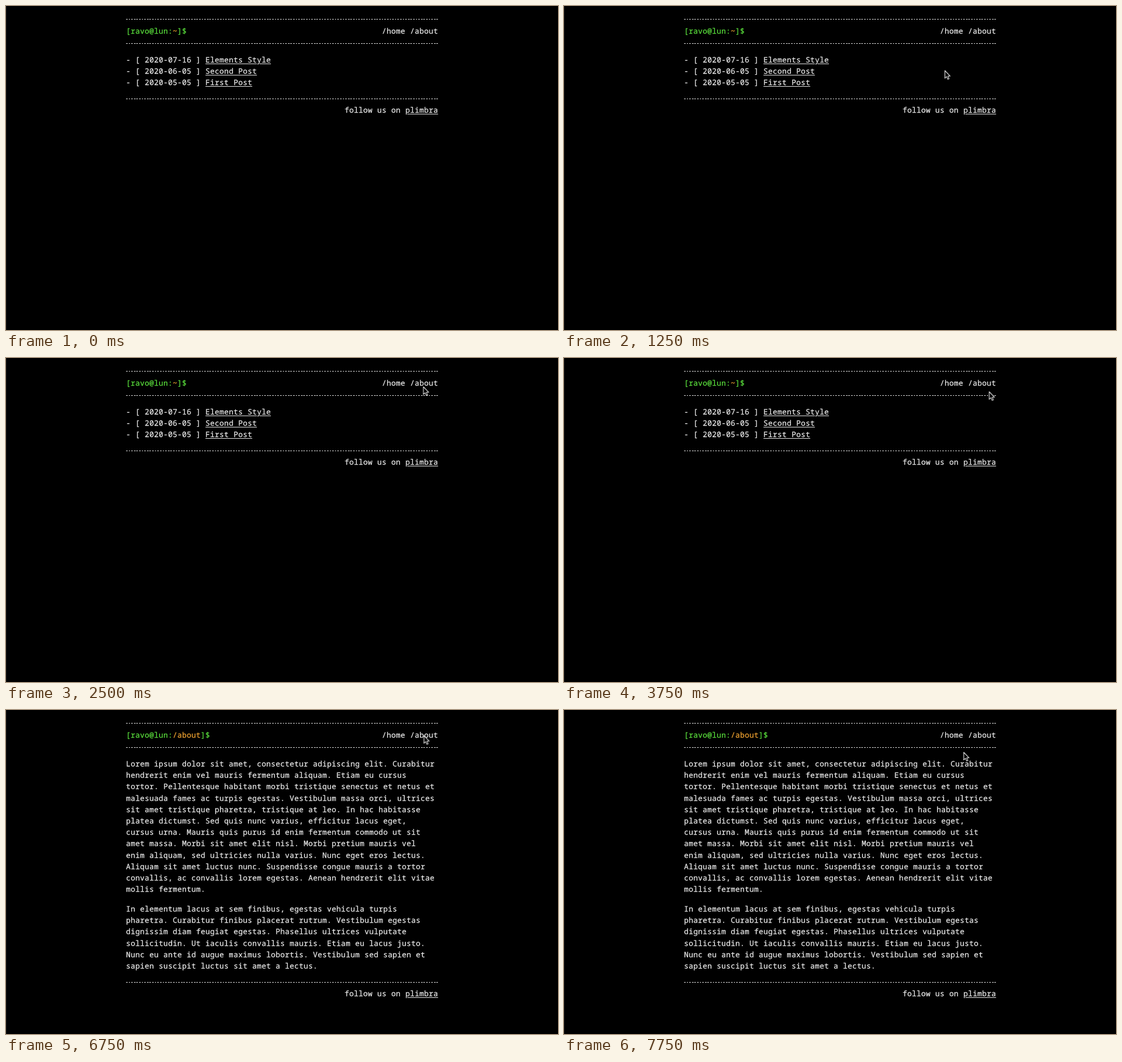
An HTML page that plays this animation: 975x574 px, repeating every 8 s.

```html
<!DOCTYPE html>
<html lang="en">
<head>
<meta charset="utf-8">
<title>Terminal blog</title>
<style>
  html, body { margin: 0; width: 100%; height: 100%; overflow: hidden; background: #000; }
  #stage {
    position: absolute; left: 0; top: 0; width: 975px; height: 574px; overflow: hidden;
    color: #ececec;
    font: 13.2px/20.21px "Noto Sans Mono", monospace;
    letter-spacing: .348px;
    text-rendering: geometricPrecision;
    -webkit-text-stroke: .25px currentColor;
  }
  #stage::before { content: ""; position: absolute; left: 0; width: 1px; height: 100%; background: #141414; }
  .page { position: absolute; inset: 0; }
  pre, .rule, .hover { position: absolute; margin: 0; font: inherit; }
  pre { left: 211.9px; white-space: pre; }
  .right { left: auto; right: 211.8px; }
  .head { top: 34.3px; }
  .prompt { color: #5adf3c; }
  .prompt i { color: #f0a330; font-style: normal; }
  .main { top: 84.9px; }
  .second { top: 342px; }
  u { text-underline-offset: 1.5px; text-decoration-thickness: 1px; }
  .rule {
    left: 211.9px; width: 551.2px; height: 1px;
    background: repeating-linear-gradient(90deg, #e0e0e0 0 2.756px, transparent 2.756px 4.609px);
  }
  .hover { left: 713px; top: 36px; width: 50.2px; height: 17.5px; background: #e6e6e6; }
  .hover pre { left: auto; right: 0; top: -1.7px; color: #000; }
  #cursor { position: absolute; left: 0; top: 0; overflow: visible; }
</style>
</head>
<body>
<div id="stage">
  <div class="rule" style="top:23px"></div>
  <div class="rule" style="top:66px"></div>
  <pre class="head right">/home /about</pre>

  <div class="page" id="home">
    <pre class="head prompt">[ravo@lun:<i>~</i>]$</pre>
    <pre class="main">- [ 2020-07-16 ] <u>Elements Style</u>
- [ 2020-06-05 ] <u>Second Post</u>
- [ 2020-05-05 ] <u>First Post</u></pre>
    <div class="rule" style="top:164px"></div>
    <pre class="right" style="top:173.8px">follow us on <u>plimbra</u></pre>
  </div>

  <div class="page" id="about">
    <pre class="head prompt">[ravo@lun:<i>/about</i>]$</pre>
    <pre class="main">Lorem ipsum dolor sit amet, consectetur adipiscing elit. Curabitur
hendrerit enim vel mauris fermentum aliquam. Etiam eu cursus
tortor. Pellentesque habitant morbi tristique senectus et netus et
malesuada fames ac turpis egestas. Vestibulum massa orci, ultrices
sit amet tristique pharetra, tristique at leo. In hac habitasse
platea dictumst. Sed quis nunc varius, efficitur lacus eget,
cursus urna. Mauris quis purus id enim fermentum commodo ut sit
amet massa. Morbi sit amet elit nisl. Morbi pretium mauris vel
enim aliquam, sed ultricies nulla varius. Nunc eget eros lectus.
Aliquam sit amet luctus nunc. Suspendisse congue mauris a tortor
convallis, ac convallis lorem egestas. Aenean hendrerit elit vitae
mollis fermentum.</pre>
    <pre class="second">In elementum lacus at sem finibus, egestas vehicula turpis
pharetra. Curabitur finibus placerat rutrum. Vestibulum egestas
dignissim diam feugiat egestas. Phasellus ultrices vulputate
sollicitudin. Ut iaculis convallis mauris. Etiam eu lacus justo.
Nunc eu ante id augue maximus lobortis. Vestibulum sed sapien et
sapien suscipit luctus sit amet a lectus.</pre>
    <div class="rule" style="top:482px"></div>
    <pre class="right" style="top:491.8px">follow us on <u>plimbra</u></pre>
  </div>

  <div class="hover" id="hover"><pre>/about</pre></div>

  <svg id="cursor" width="12" height="18">
    <path d="M.8 1V14.4L3.8 11.6 5.9 16.3 8.1 15.4 6.1 10.8H10.2Z"
          fill="#000" stroke="#f2f2f2" stroke-width="1.1" stroke-linejoin="round"/>
  </svg>
</div>
<script>
  const LOOP = 8000;

  // Plays [time, value] steps as hard cuts, each held until the next.
  function play(id, steps, toStyle) {
    const frames = steps.map(([time, ...value]) =>
      ({ offset: time / LOOP, easing: 'step-end', ...toStyle(...value) }));
    frames.push({ ...frames[frames.length - 1], offset: 1 });
    document.getElementById(id).animate(frames, { duration: LOOP, iterations: Infinity });
  }

  const opacity = value => ({ opacity: value });
  const position = (x, y) => ({ transform: `translate(${x}px, ${y}px)` });

  play('home', [[0, 1], [6750, 0]], opacity);
  play('about', [[0, 0], [6750, 1]], opacity);
  play('hover', [[0, 0], [4000, 1], [6750, 0]], opacity);
  play('cursor', [
    [0, 673, -40], [250, 673, 25.5], [500, 662, 40], [1000, 655, 65],
    [1250, 672, 113.5], [1500, 679, 117], [1750, 695, 98], [2000, 724, 65],
    [2250, 730, 58], [2500, 736.5, 50], [3000, 736.2, 50], [3250, 763, 64],
    [3500, 763.7, 64], [3750, 750.3, 58.7], [4000, 744, 51],
    [4250, 737.5, 44.5], [7750, 705.3, 74]
  ], position);
</script>
</body>
</html>
```
